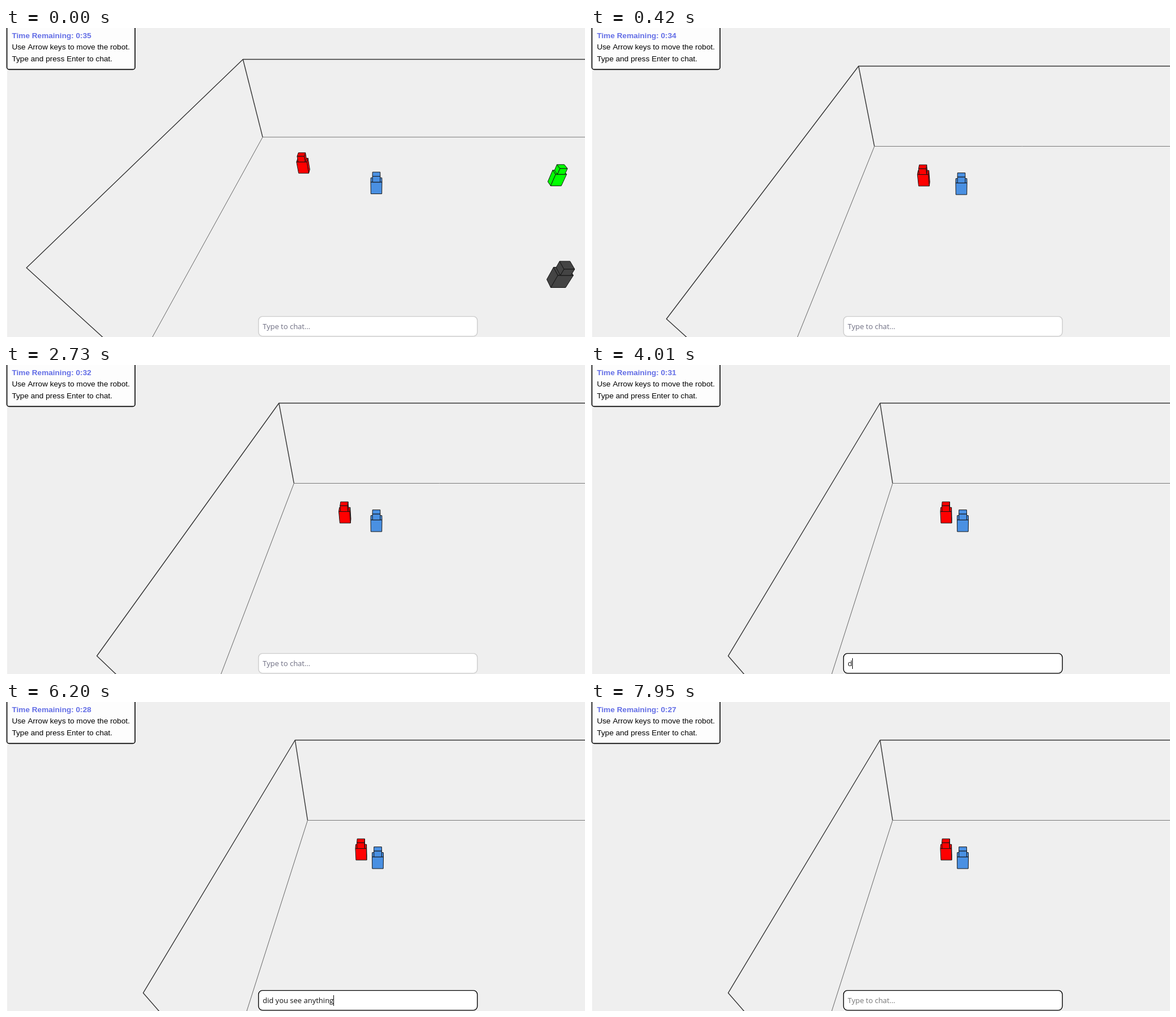
Animation, 1024 px wide and 547 px high, one loop 8000 ms. Source, as an HTML page with a canvas:

```html
<!DOCTYPE html>
<html lang="en">
<head>
<meta charset="utf-8">
<title>Robot room</title>
<style>
html, body { margin: 0; width: 100%; height: 100%; overflow: hidden; background: #efefef; }
canvas { display: block; }
</style>
</head>
<body>
<canvas id="stage" width="1024" height="547"></canvas>
<script>
const LOOP = 8000, STEP = 30;
const ctx = document.getElementById('stage').getContext('2d');
const clamp = (v, lo = 0, hi = 1) => Math.min(hi, Math.max(lo, v));

// Camera: units are camera heights, y is measured down from the camera.
const FOCAL = 564.5, MID_X = 655, MID_Y = 275, SIN = 0.6208, COS = 0.784;
function project([x, y, z]) {
  const depth = z * COS + y * SIN;
  return [MID_X + FOCAL * x / depth, MID_Y + FOCAL * (y * COS - z * SIN) / depth];
}

const WALL_TOP = 0.531, ROOM_DEPTH = 1.3265, STRIDE = 0.01345;
// Robot positions: x from the left wall, z towards the viewer from the back wall.
const others = [
  { x: 0.3205, z: 0.375, drift: 0.0005, color: '#ff0000' },
  { x: 1.600, z: 0.481, drift: 0, color: '#00ff00' },
];
const nearBot = { x: 1.352, z: 1.061, drift: 0, color: '#444444' };

const MESSAGE = 'did you see anything?';
const KEY_TIMES = [4010, 4090, 4150, 4250, 4310, 4390, 4460, 4610, 4670, 4730, 4910,
  5140, 5420, 5550, 5680, 5850, 6000, 6070, 6130, 6200, 6360];
const TICKS = [240, 1240, 2230, 3230, 4220, 5170, 6200, 7180];
const FOCUS = 3140, SEND = 6520, HIDE = 7540;
const CARET_ON = [[FOCUS, 3650], [4010, 6910], [7440, 7950]];

function path(points, color, width, fill) {
  ctx.beginPath();
  points.forEach(p => ctx.lineTo(...p));
  if (fill) {
    ctx.closePath();
    ctx.fillStyle = fill;
    ctx.fill();
  }
  ctx.strokeStyle = color;
  ctx.lineWidth = width;
  ctx.stroke();
}

function box(x, z, width, depth, bottom, height, color) {
  const l = x - width / 2, r = x + width / 2, top = bottom - height, back = z + depth;
  const face = (...pts) => path(pts.map(project), '#151515', 1, color);
  const side = l > 0 ? l : r < 0 ? r : null;
  if (side !== null) face([side, top, z], [side, top, back], [side, bottom, back], [side, bottom, z]);
  face([l, top, back], [r, top, back], [r, top, z], [l, top, z]);
  face([l, top, z], [r, top, z], [r, bottom, z], [l, bottom, z]);
}

function robot(x, z, color) {
  box(x, z, 0.053, 0.034, 1, 0.072, color);
  box(x, z, 0.036, 0.033, 0.928, 0.0345, color);
}

function drawRoom(t) {
  const n = Math.min(22, Math.floor(t / STEP));
  const m = Math.floor((t - 2480) / STEP) + 1;
  const away = clamp(Math.min(m, 15 - m), 0, 7);
  const wall = -0.7025 + STRIDE * (n - away);
  const back = 1.7235 - STRIDE * Math.min(n, 8), front = back - ROOM_DEPTH;

  const topBack = project([wall, WALL_TOP, back]), floorBack = project([wall, 1, back]);
  const topFront = project([wall, WALL_TOP, front]), floorFront = project([wall, 1, front]);
  path([floorBack, [1024, floorBack[1]]], '#777', 1);
  path([floorBack, floorFront], '#666', 1);
  path([[1024, topBack[1]], topBack, topFront, floorFront], '#333', 1.4);
  path([topBack, floorBack], '#333', 1.4);

  const place = b => robot(wall + b.x + b.drift * n, back - b.z, b.color);
  others.forEach(place);
  // The player trails the camera a little while moving.
  const goingLeft = t < 660 || (m > 7 && m < 15), goingRight = m > 0 && m <= 7;
  robot(goingLeft ? 0 : goingRight ? 0.0136 : 0.0068, n <= 8 ? 1.181 : 1.175, '#4a90e2');
  place(nearBot);
}

function label(text, x, y, font, color) {
  ctx.font = font;
  ctx.fillStyle = color;
  ctx.fillText(text, x, y);
}

function frame(x, y, w, h, radius, fill, stroke, width) {
  ctx.beginPath();
  ctx.roundRect(x, y, w, h, radius);
  ctx.fillStyle = fill;
  ctx.fill();
  ctx.strokeStyle = stroke;
  ctx.lineWidth = width;
  ctx.stroke();
}

function drawPanel(t) {
  const sans = '13.6px "Liberation Sans", Arial, sans-serif';
  const left = 35 - TICKS.filter(k => k <= t).length;
  frame(1.6, -20, 226.6, 93.4, 4, '#fdfdfd', '#000', 1.6);
  label('Time Remaining: 0:' + left, 10.5, 18, 'bold ' + sans, '#636ee6');
  label('Use Arrow keys to move the robot.', 10.5, 38.4, sans, '#000');
  label('Type and press Enter to chat.', 10.5, 58.8, sans, '#000');
}

function drawChat(t) {
  const font = '13px "Open Sans", "Noto Sans", sans-serif';
  const focus = clamp((t - FOCUS + 30) / 150);
  const gray = Math.round(204 * (1 - focus));
  const typed = t < SEND ? MESSAGE.slice(0, KEY_TIMES.filter(k => k <= t).length) : '';
  frame(446.6, 510.6, 387, 35, 7, '#fff', `rgb(${gray},${gray},${gray})`, 1.4);
  if (typed) label(typed, 454, 533, font, '#111');
  else label('Type to chat...', 454, 533, font, focus < 1 ? '#6e6e82' : '#757575');

  if (CARET_ON.some(([a, b]) => t >= a && t < b)) {
    ctx.font = font;
    ctx.fillStyle = '#000';
    ctx.fillRect(Math.round(454 + ctx.measureText(typed).width), 519, 1, 19);
  }
  if (t >= SEND && t < HIDE) {
    ctx.globalAlpha = clamp((t - SEND + STEP) / 360);
    label(MESSAGE, 657, 172, '13.3px "Open Sans", "Noto Sans", sans-serif', '#111');
    ctx.globalAlpha = 1;
  }
}

function draw(now) {
  const t = now % LOOP;
  ctx.fillStyle = '#efefef';
  ctx.fillRect(0, 0, 1024, 547);
  ctx.lineJoin = 'round';
  drawRoom(t);
  ctx.fillStyle = '#fff';
  ctx.fillRect(0, 0, 2, 547);
  drawPanel(t);
  drawChat(t);
}

let start;
function tick(now) {
  start ??= now;
  draw(now - start);
  requestAnimationFrame(tick);
}
requestAnimationFrame(tick);
</script>
</body>
</html>
```
